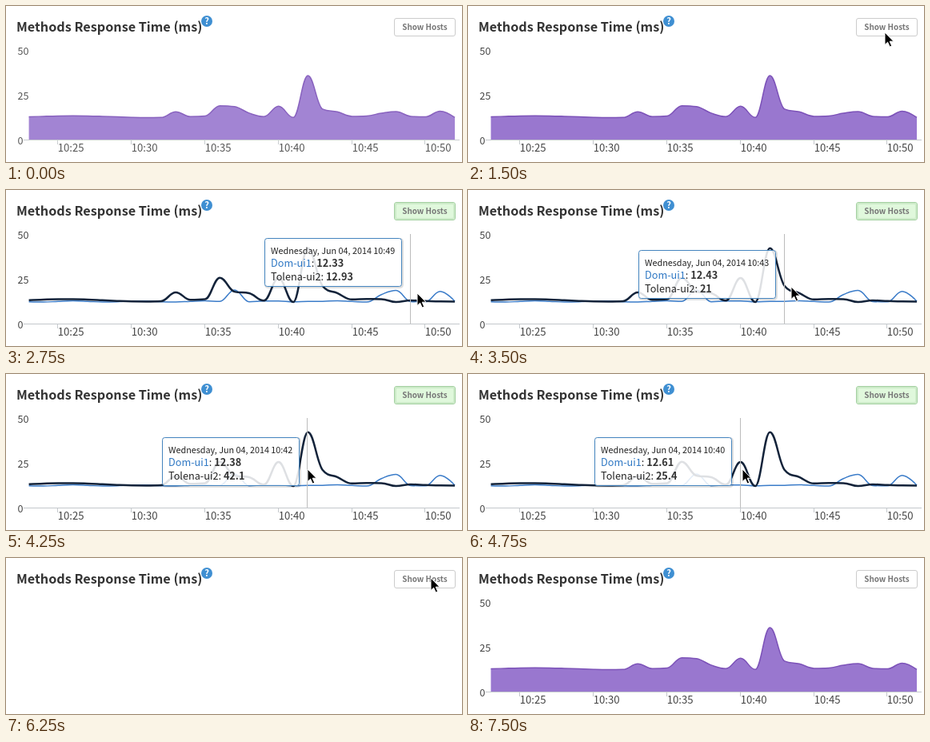
An HTML page that plays this animation: 570 px wide and 195 px high, repeating every 7.75 s.

```html
<!DOCTYPE html>
<html lang="en">
<head>
<meta charset="utf-8">
<title>Methods Response Time</title>
<style>
html, body { margin: 0; width: 570px; height: 195px; overflow: hidden; background: #fff; }
svg { display: block; font-family: "Noto Sans CJK JP", "Noto Sans CJK SC", "Noto Sans CJK", "Open Sans", sans-serif; }
path, line { fill: none; }
.axis text { font-size: 13.2px; fill: #444; }
.axis .value { font-size: 12.6px; }
.axis line { stroke: #c4c8cc; }
#tip text { font-size: 12.7px; fill: #222; }
#tip .date { font-size: 10.8px; }
#tip .name { fill: #2f78c4; }
#tip .num { font-weight: 700; fill: #333; }
</style>
</head>
<body>
<svg width="570" height="195" viewBox="0 0 570 195">
  <text x="13" y="32.3" font-size="16.2" font-weight="700" fill="#333">Methods Response Time (ms)</text>
  <circle cx="251" cy="19" r="7" fill="#3f8fd2"/>
  <text x="251" y="23" font-size="11" font-weight="700" fill="#fff" text-anchor="middle">?</text>
  <rect id="button" x="485.5" y="15.5" width="76" height="22" rx="2.5"/>
  <rect id="pressed" x="487" y="17" width="73" height="19" rx="2" fill="none" stroke="#cdebc9" stroke-width="2"/>
  <text x="523.5" y="30.3" font-size="9.9" font-weight="700" fill="#777" text-anchor="middle">Show Hosts</text>
  <g id="chart">
    <g id="total">
      <path id="area" style="fill:#9977cf"/>
      <path id="edge" stroke="#7c52b8" stroke-width="1.5"/>
    </g>
    <g class="axis" id="axis"></g>
    <g id="hosts">
      <path id="blue" stroke="#3b7cc9" stroke-width="1.5"/>
      <path id="dark" stroke="#13233a" stroke-linejoin="round"/>
    </g>
    <line id="cross" y1="55" y2="167" stroke="#bcbcbc"/>
    <g id="tip">
      <rect x="1.5" y="1.5" width="171" height="60" rx="3" fill="none" stroke="#000" stroke-opacity=".12" stroke-width="3"/>
      <rect x=".5" y=".5" width="171" height="60" rx="3" fill="#fff" fill-opacity=".86" stroke="#4585bf"/>
      <text class="date" x="8" y="20.3"></text>
      <text x="8" y="35.8"><tspan class="name">Dom-ui1</tspan>: <tspan class="num"></tspan></text>
      <text x="8" y="52.6">Tolena-ui2: <tspan class="num"></tspan></text>
    </g>
  </g>
  <path id="cursor" d="M0 0V15.5L3.6 12.2L6.2 18L8.7 16.9L6.2 11.2H11Z" style="fill:#000" stroke="#fff"/>
</svg>
<script>
const LOOP = 7750, STEP = 250, FIRST = 23, LAST = 52;
const $ = id => document.getElementById(id);
const px = minute => 65.3 + (minute - 25) * 18.36;
const py = ms => 167 - ms * 2.24;
const clamp = (v, a, b) => Math.min(Math.max(v, Math.min(a, b)), Math.max(a, b));

// a gentle ripple with peaks at given minutes
const series = (base, swing, speed, crest, peaks) => minute =>
  peaks[minute] ?? +(base + swing * Math.cos(speed * (minute - crest))).toFixed(2);

const total = series(12.8, .5, .6, 26, { 33: 15.5, 36: 18.9, 37: 18.4, 38: 14.8, 40: 18.6, 42: 35.7,
  43: 17, 44: 15.5, 47: 14.7, 48: 15.6, 51: 15.9 });
const blue = series(12.35, .35, 1.4, 26, { 37: 18.8, 42: 12.38, 47: 16.2, 48: 18.49, 49: 12.33, 51: 18 });
const dark = series(13, .7, .6, 25.5, { 33: 17.4, 36: 25.6, 37: 17.8, 38: 17, 40: 25.4, 41: 12, 42: 42.1,
  43: 21, 44: 17, 48: 12, 49: 12.93 });

// smooth curve that never overshoots its points
function spline(value) {
  const point = minute => [px(minute), py(value(minute))];
  let out = point(FIRST), d = "M" + out;
  for (let m = FIRST + 1; m < LAST; m++) {
    const [ax, ay] = point(m - 1), [x, y] = point(m), [bx, by] = point(m + 1);
    const reach = (x - ax) * .4, rise = (by - ay) / (bx - ax) * reach;
    const ry = clamp(2 * y - clamp(y - rise, ay, y), by, y);
    d += `C${out} ${x - reach},${2 * y - ry} ${x},${y}`;
    out = [x + reach, ry];
  }
  const end = point(LAST);
  return `${d}C${out} ${end} ${end}`;
}

// pointer path: [time, x, y]
const path = [[1000, 544, 17], [1250, 544, 17], [1500, 521, 33], [2250, 521, 33], [2500, 516, 35],
  [2750, 514, 129], [3500, 404, 121], [4250, 377, 119], [4750, 343, 119], [5250, 343, 119],
  [5500, 513, 47], [6000, 531, 25]];

function pointer(t) {
  const i = path.findLastIndex(p => p[0] <= t);
  const [t0, x0, y0] = path[i], [t1, x1, y1] = path[i + 1] ?? [t + 1, x0, y0];
  const u = (t - t0) / (t1 - t0), ease = u * u * (3 - 2 * u);
  return [x0 + (x1 - x0) * ease, y0 + (y1 - y0) * ease];
}

const show = (el, on) => el.style.display = on ? "" : "none";
const move = (el, x, y) => el.setAttribute("transform", `translate(${x} ${y})`);
const set = (el, attrs) => { for (const k in attrs) el.setAttribute(k, attrs[k]); };
const within = (t, from, to) => t >= from && t < to;

const curve = spline(total);
set($("edge"), { d: curve });
set($("area"), { d: `${curve}V167H${px(FIRST)}Z` });
set($("blue"), { d: spline(blue) });
set($("dark"), { d: spline(dark) });

let axis = '<line x1="22" x2="567" y1="167.5" y2="167.5"/>';
for (const v of [0, 25, 50]) axis += `<text class="value" x="14.5" y="${py(v) + 5.5}">${v}</text>`;
for (let m = 25; m <= 50; m += 5) {
  const x = Math.round(px(m));
  axis += `<line x1="${x - .5}" x2="${x - .5}" y1="167" y2="173"/><text x="${x - .3}" y="181.7">10:${m}</text>`;
}
$("axis").innerHTML = axis;

const tip = $("tip"), date = tip.querySelector(".date"), nums = tip.querySelectorAll(".num");

function drawTip(minute, top) {
  const x = Math.round(px(minute)) - .5;
  set($("cross"), { x1: x, x2: x });
  move(tip, Math.round(px(minute) - 182.8), Math.round(top));
  date.textContent = `Wednesday, Jun 04, 2014 10:${minute}`;
  nums[0].textContent = blue(minute);
  nums[1].textContent = dark(minute);
}

function draw(time) {
  const t = Math.floor(time / STEP) * STEP;
  const split = within(t, 2000, 6250);
  const loading = within(t, 2000, 2250) || within(t, 6250, 6500);
  show($("chart"), !loading);
  show($("total"), !split);
  show($("hosts"), split);
  $("chart").style.opacity = t < 250 ? .9 : 1;
  set($("button"), split ? { fill: "#e0f8dc", stroke: "#a3cfa0" } : { fill: "#fff", stroke: "#ccc" });
  show($("pressed"), split);

  const hover = within(t, 2750, 5500), leaving = within(t, 5500, 5750);
  set($("dark"), { "stroke-width": hover ? 2.5 : 1.5 });
  show($("cross"), hover);
  show(tip, hover || leaving);

  const visible = within(t, 1000, 7000);
  show($("cursor"), visible);
  if (!visible) return;
  const [x, y] = pointer(t);
  move($("cursor"), x, y);
  if (hover) drawTip(Math.round(25 + (x - 65) / 18.36), 60 + (129 - y) * 1.9);
  if (leaving) drawTip(48, 60);
}

function tick() {
  draw(performance.now() % LOOP);
  requestAnimationFrame(tick);
}
tick();
</script>
</body>
</html>
```
